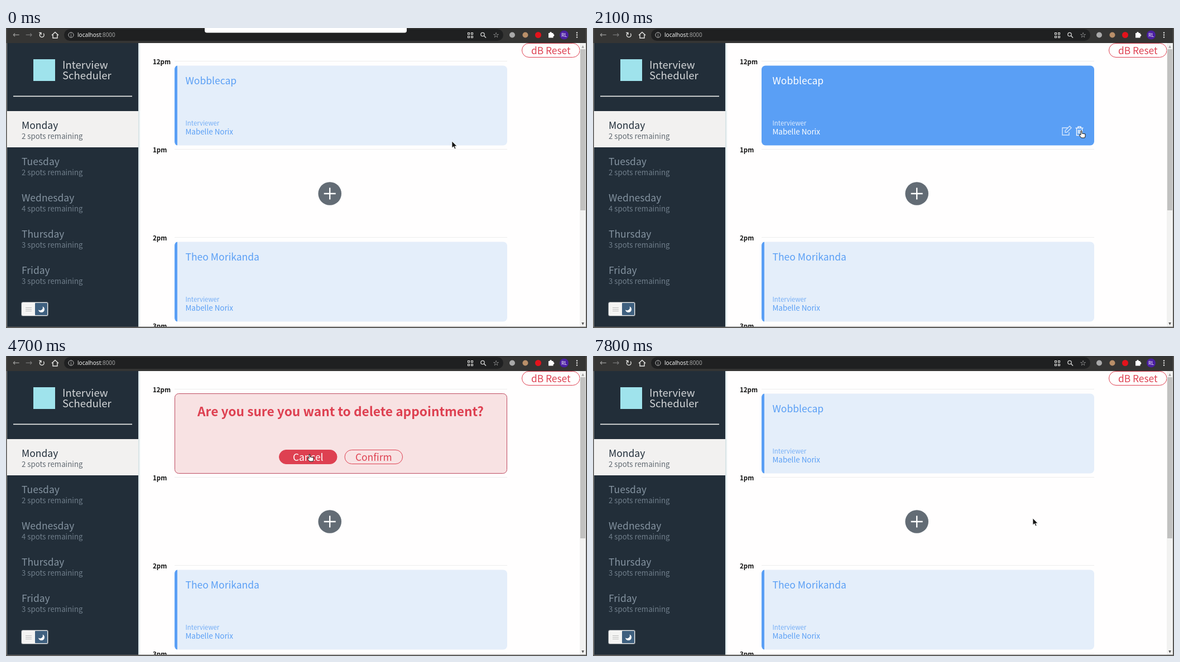
Write an HTML page that moves like this. It is 1041 px wide and 538 px high and loops after 8000 ms.

```html
<!DOCTYPE html>
<html lang="en">
<head>
<meta charset="utf-8">
<title>Interview Scheduler</title>
<style>
html, body { margin: 0; width: 100%; height: 100%; overflow: hidden; background: #fffefe; }
svg { display: block; width: 1041px; height: 538px; font-family: "Noto Sans CJK JP", "Noto Sans CJK SC", "Noto Sans CJK", "Open Sans", sans-serif; }
.light { font-weight: 300; opacity: .8; }
.bold { font-weight: 700; }
.mid { text-anchor: middle; }
.url { font-family: "Noto Sans", sans-serif; }
.icon { font-family: "DejaVu Sans", sans-serif; text-anchor: middle; }
.line { fill: none; stroke: currentColor; }
</style>
</head>
<body>
<svg id="stage" viewBox="0 0 1041 538"></svg>
<script>
const BLUE = '#5a9ff5', PALE = '#e4eefa', RED = '#de4051', GREY = '#8493a0', EDGE = '#555452';
const DURATION = 8000, STEP = 100;
const HOUR = 158; // height of one hour in the schedule
const card = { x: 302, y: 67.5, w: 596, h: 143 };
const cancel = { x: 489, y: 168, w: 104.5, h: 26 };
const confirm = { ...cancel, x: 606.5 };
const reset = { ...cancel, x: 924, y: 27 };
const trash = { x: 864, y: 176, w: 15, h: 17 };

const text = (x, y, size, fill, content, type = '') =>
  `<text x="${x}" y="${y}" font-size="${size}" fill="${fill}" class="${type}">${content}</text>`;
const rect = (x, y, w, h, fill, extra = '') =>
  `<rect x="${x}" y="${y}" width="${w}" height="${h}" fill="${fill}" ${extra}/>`;
const circle = (x, y, r, fill, extra = '') =>
  `<circle cx="${x}" cy="${y}" r="${r}" fill="${fill}" ${extra}/>`;
const line = (d, color, width = 1, extra = '') =>
  `<path class="line" d="${d}" color="${color}" stroke-width="${width}" ${extra}/>`;
const group = (id, content) => `<g id="${id}">${content}</g>`;
const repeat = (n, make) => Array.from({ length: n }, (_, i) => make(i)).join('');

function toolbar() {
  const white = '#e8e8e6';
  return rect(0, 0, 1041, 27, '#353534')
    + rect(104, 2, 787, 21, '#1f2021', 'rx="10.5"')
    + text(18, 17, 15, '#9b9b9a', '←', 'icon')
    + text(41, 17, 15, '#777', '→', 'icon')
    + text(64, 17.5, 15, white, '↻', 'icon')
    + line('M82 13l6-5.5 6 5.5M84 12v6h8v-6', white, 1.4)
    + circle(116.5, 12.5, 4.6, 'none', 'stroke="#c5c5c5"')
    + text(116.5, 15.5, 8, '#c5c5c5', 'i', 'icon')
    + text(128, 16, 10, '#f2f2f2', 'localhost<tspan fill="#a0a0a0">:8000</tspan>', 'url')
    + repeat(4, i => rect(827.5 + i % 2 * 6, 8.5 + (i >> 1) * 6, 3, 3, 'none', `stroke="${white}"`))
    + circle(854, 11.5, 3.2, 'none', 'stroke="#d5d5d5" stroke-width="1.3"')
    + line('M856.5 14l3.5 3.5', '#d5d5d5', 1.4)
    + text(878, 17, 13, '#e5e5e5', '☆', 'icon')
    + circle(907, 12.5, 5, '#a9a9a9') + circle(930.5, 12.5, 5, '#b98f69') + circle(953.5, 12.5, 5.5, '#e3131c')
    + rect(972, 9, 8.5, 8.5, '#fff') + circle(976, 9, 1.9, '#fff') + circle(980.5, 13, 1.9, '#fff')
    + circle(1000, 12.5, 8, '#4b1fa3') + text(1000, 15.8, 8.5, '#fff', 'RL', 'mid')
    + repeat(3, i => circle(1023, 8.5 + i * 4, 1.2, white));
}

function sidebar() {
  const days = { Monday: 2, Tuesday: 2, Wednesday: 4, Thursday: 3, Friday: 3 };
  const list = Object.entries(days).map(([day, spots], i) => {
    const y = 149 + i * 65.2;
    return text(28, y + 31.5, 17.5, i ? GREY : '#222f3b', day)
      + text(28, y + 49.5, 13.25, i ? GREY : '#3c4751', `${spots} spots remaining`, 'light');
  }).join('');
  return rect(237, 27, 2, 509, '#d9e5e7') + rect(239, 27, 2, 509, '#f5f8f9')
    + rect(2, 27, 235, 509, '#222e39')
    + rect(49, 56, 39, 39, '#9fe3ec')
    + text(101, 73.3, 18.6, '#fff', 'Interview', 'light')
    + text(101, 92, 18.6, '#fff', 'Scheduler', 'light')
    + rect(13, 121.6, 213, 1.6, '#f4f4f2')
    + rect(2, 149, 235, 65, '#f2f1f0')
    + list
    + rect(27, 491, 49, 26, '#fff', 'rx="3.5" opacity=".35"')
    + rect(28, 492, 47, 24, '#f4f4f3', 'rx="2.5"')
    + rect(52, 493, 22, 22, '#3f607f', 'rx="1"')
    + repeat(3, i => rect(35, 501 + i * 3, 11, 1, '#bdbdbd'))
    + circle(63.5, 504.5, 5.5, '#fff') + circle(61, 501.5, 5, '#3f607f');
}

function appointment(hour, name, hot) {
  const { x, w, h } = card, y = card.y + hour * HOUR;
  const tint = hot ? '#fff' : BLUE;
  const bar = `<path d="M${x + 5} ${y}v${h}a5 7 0 0 1 -5 -7v${14 - h}a5 7 0 0 1 5 -7" fill="${BLUE}"/>`;
  return rect(x, y, w, h, hot ? BLUE : PALE, 'rx="7"') + (hot ? '' : bar)
    + text(321.5, y + 33.5, 17.5, tint, name)
    + text(321.5, y + 107, 11.4, tint, 'Interviewer', 'light')
    + text(321.5, y + 123.5, 13.4, tint, 'Mabelle Norix');
}

const actions =
  line('M851 179h-10v13h12v-5M846 187v-3l8-8 3 3-8 8z', '#fff', 1.4, 'opacity=".75"')
  + line('M864.5 179.3h14M869 179v-2.2h5V179M866.5 179.5v13h10v-13M869.5 182.5v7m2 0v-7m2 0v7', '#fff', 1.3, 'id="trash"');

const pill = (id, { x, y, w, h }, label) => group(id,
  rect(x + .5, y + .5, w - 1, h - 1, 'none', `rx="${h / 2 - .5}" stroke="${RED}"`)
  + text(x + w / 2, y + 19.6, 17.4, RED, label, 'mid'));

const question = rect(card.x + .5, card.y, card.w - 1, card.h, '#f8e2e3', 'rx="7" stroke="#bd4a60"')
  + text(599.5, 108, 22.7, RED, 'Are you sure you want to delete appointment?', 'bold mid')
  + pill('cancel', cancel, 'Cancel') + pill('confirm', confirm, 'Confirm');

const schedule = ['12pm', '1pm', '2pm', '3pm'].map((hour, i) =>
    text(263, 64.5 + i * HOUR, 11.5, '#111', hour, 'bold')
    + rect(card.x, 59 + i * HOUR, card.w, 1, '#ededed')).join('')
  + circle(580.2, 297, 20.8, '#636c75') + line('M569.7 297h21m-10.5-10.5v21', '#fff', 2.4)
  + appointment(2, 'Theo Morikanda')
  + pill('reset', reset, 'dB Reset');

const frame = rect(1028, 27, 11, 509, '#f2f2f1') + rect(1029, 38, 9, 289, '#c1c1c0')
  + text(1033.5, 35, 6, '#a0a0a0', '▲', 'icon') + text(1033.5, 532, 6, '#505050', '▼', 'icon')
  + rect(0, 0, 1.6, 538, EDGE) + rect(1039, 0, 2, 538, EDGE) + rect(0, 535.7, 1041, 2.3, '#5f5e5c');

const pointer = group('cursor',
  '<path id="arrow" d="M0 0V12L3 9.5 5 14 7 13 5 9H9Z" fill="#161616" stroke="#fff" stroke-width=".7"/>'
  + '<path id="hand" d="M-1 8V1q1-2 2 0v4l6 1v4l-1 3H0l-4-5q1-2 3 0" fill="#fff" stroke="#161616"/>');

document.getElementById('stage').innerHTML = rect(0, 0, 1041, 538, '#fffefe') + schedule
  + group('calm', appointment(0, 'Wobblecap'))
  + group('hot', appointment(0, 'Wobblecap', true) + actions)
  + group('question', question)
  + sidebar() + toolbar() + frame
  + group('popup', rect(356, -8, 362, 16.5, '#fff', 'rx="4"'))
  + pointer;

// Cursor moves: start time, end time, destination; it rests in between.
const start = [799, 203];
const moves = [
  [100, 500, 690, 207], [600, 900, 571, 157], [900, 1500, 885, 203], [1500, 1800, 830, 180],
  [1800, 2100, 875, 184], [2200, 2700, 706, 220], [2800, 3000, 679, 212], [3000, 3100, 640, 159],
  [3300, 3600, 548, 178], [3600, 4000, 600, 177], [4100, 4200, 544, 176],
  [6500, 6800, 497, 128], [6800, 7100, 555, 172], [7200, 7400, 812, 183], [7600, 7800, 788, 291]
];

const clamp = k => Math.min(1, Math.max(0, k));
const ease = k => k * k * (3 - 2 * k);
const cursorAt = t => moves.reduce(([x, y], [from, to, endX, endY]) => {
  const k = ease(clamp((t - from) / (to - from)));
  return [x + (endX - x) * k, y + (endY - y) * k];
}, start);

const el = id => document.getElementById(id);
const show = (id, on) => el(id).setAttribute('display', on ? 'inline' : 'none');

function fillPill(id, on) {
  const [box, label] = el(id).children;
  box.setAttribute('fill', on ? RED : 'none');
  label.setAttribute('fill', on ? '#fff' : RED);
}

function draw(now) {
  const t = Math.floor(now % DURATION / STEP) * STEP;
  const [x, y] = cursorAt(t);
  const over = box => x >= box.x && x <= box.x + box.w && y >= box.y && y <= box.y + box.h;
  const asking = t >= 2300 && t < 6200;
  const hovered = !asking && t >= 300 && over(card);
  const onTrash = hovered && over(trash);
  const onCancel = asking && over(cancel), onConfirm = asking && over(confirm);
  const clickable = onTrash || onCancel || onConfirm;
  show('popup', t < 200);
  show('question', asking);
  show('hot', hovered);
  show('calm', !asking && !hovered);
  fillPill('cancel', t < 3100 || onCancel);
  fillPill('confirm', onConfirm);
  el('trash').setAttribute('opacity', onTrash ? 1 : .75);
  show('hand', clickable);
  show('arrow', !clickable);
  el('cursor').setAttribute('transform', `translate(${x} ${y})`);
  requestAnimationFrame(draw);
}
requestAnimationFrame(draw);
</script>
</body>
</html>
```
